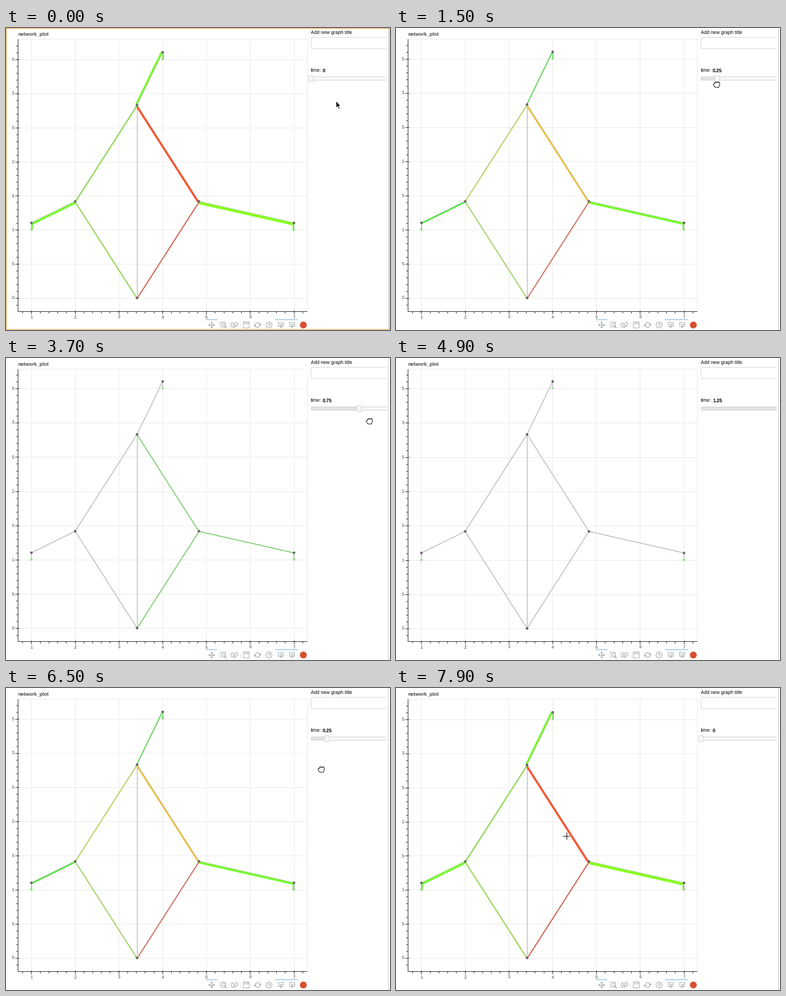
These frames come from a looping animation (844x663 px, 8 s). A matplotlib script:

```python
from colorsys import hsv_to_rgb

import numpy as np
import matplotlib.pyplot as plt
from matplotlib.animation import FuncAnimation
from matplotlib.patches import Arc, Circle, Ellipse, FancyBboxPatch, PathPatch, Polygon, Rectangle
from matplotlib.path import Path
from matplotlib.transforms import Affine2D

W, H = 844, 663
STEP, FRAMES = 100, 80
plt.rcParams["font.family"] = "Liberation Sans"
plt.rcParams["text.hinting"] = "none"

# At 72 dpi one point is one pixel.
fig = plt.figure(figsize=(W / 72, H / 72), dpi=72, facecolor="white")
ax = fig.add_axes([0, 0, 1, 1])
ax.set_xlim(0, W)
ax.set_ylim(H, 0)
ax.axis("off")

LEFT, RIGHT, TOP, BOTTOM = 26.5, 662.5, 23.5, 621.5
INK, GRID, ICON = "#444444", "#e5e5e5", "#a1a6a9"
panel = Rectangle((0, 0), 837, H, transform=ax.transData)


def segs(lines, color, lw=1, z=1, crisp=False):
    """Draw separate (x0, y0, x1, y1) segments; crisp ones fill whole pixels."""
    shift = 0.5 if crisp else 0
    pts = np.array(lines, float).reshape(-1, 2, 2) + [-shift, shift]
    pts = np.insert(pts, 2, np.nan, axis=1).reshape(-1, 2)
    return ax.plot(*pts.T, color=color, lw=lw, zorder=z, snap=crisp or None,
                   solid_capstyle="butt")[0]


def label(x, y, s, size=10.67, color="black", z=2, **kw):
    return ax.text(x, y, s, fontsize=size, color=color, zorder=z, **kw)


def shape(patch):
    return ax.add_patch(patch)


def rounded(x, y, w, h, r, face, edge, z=2):
    return shape(FancyBboxPatch((x, y), w, h, fc=face, ec=edge, lw=1, zorder=z,
                                boxstyle=f"round,pad=0,rounding_size={r}"))


def px(x):
    return 55.8 + 96.2 * (x - 1)


# ---- network ----
R2 = 2 ** 0.5
NODES = {
    "S": (2 + R2, 0), "W": (2, R2), "N": (2 + R2, 2 * R2), "E": (2 + 2 * R2, R2),
    "w": (1, 1.1), "n": (4, 3.6), "e": (7, 1.1),
    "w0": (1, 1), "n0": (4, 3.5), "e0": (7, 1),
}
# Flow along each edge: slider steps it lasts, width and hue at the start,
# hue one step later.
EDGES = {
    ("e0", "e"): (5, 3, 103, 103), ("e", "E"): (5, 6, 92, 98),
    ("E", "N"): (4, 4.3, 11, 45), ("E", "S"): (4, 2, 8, 8),
    ("N", "n"): (2, 4.3, 98, 115), ("n", "n0"): (2, 3, 103, 115),
    ("N", "W"): (3, 2.2, 95, 75), ("S", "W"): (3, 2, 88, 88),
    ("W", "w"): (3, 5, 98, 115), ("w", "w0"): (2, 3, 103, 115),
}
THIN, CALM_HUE = 1.3, 113


def flow(step, life, width, hue0, hue1):
    """Width and colour of a band: short-lived flows fade faster."""
    if step >= life:
        return 0, "white"
    fade = max(0, 1 - step / 2) ** (10 / life ** 2) if step else 1
    w = THIN + (width - THIN) * fade
    hue = (hue0, hue1)[step] if step < 2 else CALM_HUE
    return w, hsv_to_rgb(hue / 360, 0.62 + 0.04 * w, min(1, 0.82 + 0.035 * w))


def build_state(step):
    """Make every artist that depends on the slider step."""
    bands = {edge: flow(step, *spec) for edge, spec in EDGES.items()}
    # The y range grows to take in bands that stick out at either end.
    below = 0.54 * max(bands["E", "S"][0], bands["S", "W"][0])
    above = 0.44 * bands["N", "n"][0]
    y0, unit = 593.7 - below, 150.62 - 0.278 * (below + above)

    def py(y):
        return y0 - unit * y

    def at(name):
        x, y = NODES[name]
        return np.array([px(x), py(y)])

    major = [py(v / 2) for v in range(8)]
    minor = [y for y in (py(v / 10) for v in range(-2, 40)) if TOP < y < BOTTOM]
    parts = [
        segs([(LEFT, y, RIGHT, y) for y in major], GRID, crisp=True),
        segs([(20.5, y, 28.5, y) for y in major], "black", z=3, crisp=True),
        segs([(22.5, y, LEFT, y) for y in minor], "black", z=3, crisp=True),
        segs([(*at("S"), *at("N"))], "#999999", 1.1, z=4),
        segs([(*at(a), *at(b)) for a, b in EDGES], "#bebebe", 1.9, z=4),
    ]
    for v, y in enumerate(major):
        parts.append(label(17.5, y, "5" if v % 2 else str(v // 2), 9.6, INK,
                           ha="right", va="center_baseline"))
    for name in NODES:
        end = name.endswith("0")
        parts.append(shape(Circle(at(name), 2.4, fc="#a5e39a" if end else "#666666",
                                  ec="#8fdc84" if end else "#5c5c5c", lw=0.6,
                                  zorder=5 if end else 7)))
    for (start, stop), (width, color) in bands.items():
        a, b = at(start), at(stop)
        dx, dy = (b - a) / np.hypot(*(b - a))
        side = np.array([dy, -dx]) * width
        parts.append(shape(Polygon([a, b, b + side, a + side], fc=color, lw=0, zorder=6)))
    return parts


states = [build_state(step) for step in range(6)]

# ---- axes frame ----
segs([(px(v), TOP, px(v), BOTTOM) for v in range(1, 8)]
     + [(LEFT, TOP, RIGHT, TOP), (RIGHT - 0.5, TOP, RIGHT - 0.5, BOTTOM)], GRID, crisp=True)
segs([(LEFT, TOP, LEFT, BOTTOM), (LEFT, BOTTOM, RIGHT, BOTTOM)], "black", z=3, crisp=True)
segs([(px(v), 619.5, px(v), 627.5) for v in range(1, 8)], "black", z=3, crisp=True)
segs([(px(v / 5), BOTTOM, px(v / 5), 625.5) for v in range(4, 37)], "black", z=3, crisp=True)
for v in range(1, 8):
    label(px(v), 634.5, str(v), 9.6, INK, ha="center", va="center_baseline")
label(26, 17.3, "network_plot", 10.9, INK, weight="bold")

# ---- toolbar ----
segs([(439, 639.5, 464, 639.5), (591, 639.5, 641, 639.5)], "#4f9fd0", crisp=True)
segs([(x, 646, x, 658) for x in (490, 515)], "#dddddd", crisp=True)


def icon(*lines, lw=1.4):
    segs(lines, ICON, lw)


def ring(x, y, w, h):
    shape(Ellipse((x, y), w, h, fc="white", ec=ICON, lw=1.3, zorder=2))


def tri(*pts):
    shape(Polygon(pts, fc=ICON, lw=0, zorder=2))


def frame(x, y, w, h, **kw):
    shape(Rectangle((x, y), w, h, fc="none", ec=ICON, lw=1.2, zorder=2, snap=False, **kw))


icon((447, 652, 457, 652), (452, 647, 452, 657))
for c, s in ((0, 1), (0, -1), (1, 0), (-1, 0)):
    tip = np.array([452 + 7.5 * c, 652 + 7.5 * s])
    back, across = np.array([c, s]) * 3.5, np.array([s, c]) * 3
    tri(tip, tip - back + across, tip - back - across)

frame(470.5, 645.5, 12, 12, ls=(0, (2, 1.5)))
ring(478, 651, 8, 8)
icon((480.5, 654, 485, 659), lw=2)

ring(497.5, 652, 5, 10)
ring(506, 650.5, 7, 8)
icon((504.5, 654, 501, 658.5), lw=1.8)

frame(521.5, 645.5, 13, 13)
frame(525, 645.5, 7, 4)

for turn in (0, 180):
    shape(Arc((553, 652), 10.5, 10.5, angle=turn, theta1=20, theta2=160, color=ICON,
              lw=1.4, zorder=2))
tri((560.5, 648), (560.5, 653), (555.5, 652.5))
tri((545.5, 656), (545.5, 651), (550.5, 651.5))

ring(578, 652, 13, 13)
label(578, 652.2, "?", 10.5, ICON, z=3, weight="bold", ha="center", va="center_baseline")

for x in (604, 629):
    frame(x - 5.5, 646.5, 11, 8.5)
    icon((x - 3, 649.5, x + 3, 649.5), (x - 3, 652, x + 3, 652), lw=1)
    tri((x - 2.5, 655.5), (x + 2.5, 655.5), (x, 659))

shape(Circle((653.5, 652), 7.5, fc="#d6502f", lw=0, zorder=2))

# ---- side panel ----
KNOB0, KNOB_STEP = 670.5, 35.3
segs([(840.5, 0, 840.5, H)], "#bdbdbd", crisp=True)
label(670, 13.8, "Add new graph title")
label(670, 97.3, "time:")
value = label(696, 97.3, "0", weight="bold")
field = rounded(670.5, 20.5, 190, 25, 3, "white", "#cccccc")
track = rounded(670.5, 107.5, 190, 7, 2, "#fafafa", "#c6c6c6")
fill = shape(Rectangle((671, 108), 0, 6, fc="#e4e4e4", lw=0, zorder=3))
handle = rounded(665, 104.5, 11, 13.5, 3, "#f7f7f7", "#c6c6c6", z=4)
for part in (field, track, fill, handle):
    part.set_clip_path(panel)
tooltip = [rounded(663.5, 76.5, 15, 22.5, 2.5, "white", "#c6c6c6", z=5),
           label(671, 87.5, "0", 11.5, z=6, ha="center", va="center_baseline")]
focus = shape(Rectangle((1, 0.8), 841.8, 661.2, fc="none", ec="#f5b768", lw=1.8, zorder=8))

# ---- mouse pointers ----


def pointer(pts, face, edge, lw):
    return shape(PathPatch(Path(np.vstack([pts, pts[:1]])), fc=face, ec=edge, lw=lw,
                           joinstyle="round", zorder=10))


def hand(lift):
    """A palm with four round knuckles on top."""
    x = np.linspace(-4, 6.4, 17)
    bumps = np.column_stack([x, -4 - lift - 1.6 * abs(np.sin(np.pi * (x + 4) / 2.6))])
    thumb = [(-6.5, 2), (-7, 0), (-6, -2), (-4, -1.5)]
    heel = [(7, 1), (5, 4), (5, 6.3), (-3, 6.3)]
    return pointer(np.vstack([thumb, bumps, heel]), "white", "black", 1.1)


arm = np.array([(1, 1), (8.5, 1), (8.5, -1)])
cross = []
for _ in range(4):
    cross.extend(arm)
    arm = arm[:, ::-1] * [1, -1]
arrow = [(0, 0), (0, 14.5), (3.3, 11.5), (5.6, 17), (8, 16), (5.7, 10.7), (10, 10.5)]
pointers = {
    "arrow": pointer(arrow, "#1a1a1a", "white", 0.8),
    "open": hand(3),
    "fist": hand(0),
    "cross": pointer(cross, "black", "white", 0.8),
}

# Straight moves: start and end in ms, then where they lead.
START = (725.5, 160.5)
MOVES = [
    (100, 600, 674, 111), (800, 1600, 709, 126), (1700, 2400, 741, 131),
    (2600, 3200, 773, 134), (3300, 4000, 818, 142), (4300, 4900, 862, 150),
    (5400, 6300, 704, 177), (6300, 6800, 676, 181),
]
GRAB, RELEASE, END = 800, 6900, 7900
BEND, REST = np.array((374.5, 650)), np.array((374.5, 324.5))


def mouse(t):
    pos = np.array(START)
    for t0, t1, x, y in MOVES:
        pos += (np.array((x, y)) - pos) * np.clip((t - t0) / (t1 - t0), 0, 1)
    # Last, an eased curve into the plot.
    s = np.clip((t - RELEASE) / (END - RELEASE), 0, 1)
    s = 1 - (1 - s) ** 2
    return pos * (1 - s) ** 2 + 2 * s * (1 - s) * BEND + s ** 2 * REST


def slider_step(t):
    """Quarter steps; the plot answers one tick after the mouse."""
    if not GRAB <= t < RELEASE:
        return 0
    return int(np.clip(round((mouse(t - STEP)[0] - 674) / KNOB_STEP), 0, 5))


def pointer_kind(t):
    if t < 600:
        return "arrow"
    if t < GRAB:
        return "open"
    return "fist" if t <= RELEASE else "cross"


def update(i):
    t = i * STEP
    step = slider_step(t)
    for k, parts in enumerate(states):
        for part in parts:
            part.set_visible(k == step)

    value.set_text(f"{step / 4:.2f}" if step % 4 else str(step // 4))
    handle.set_x(KNOB0 + KNOB_STEP * step - 5.5)
    fill.set_width(KNOB_STEP * step)
    for part in tooltip:
        part.set_visible(600 <= t <= 1000)
    focus.set_visible(t < GRAB)

    kind = pointer_kind(t)
    for name, art in pointers.items():
        art.set_visible(name == kind)
    pointers[kind].set_transform(Affine2D().translate(*mouse(t)) + ax.transData)
    return []


anim = FuncAnimation(fig, update, frames=FRAMES, interval=STEP, repeat=True,
                     repeat_delay=0, init_func=lambda: [], blit=False)
plt.show()
```
